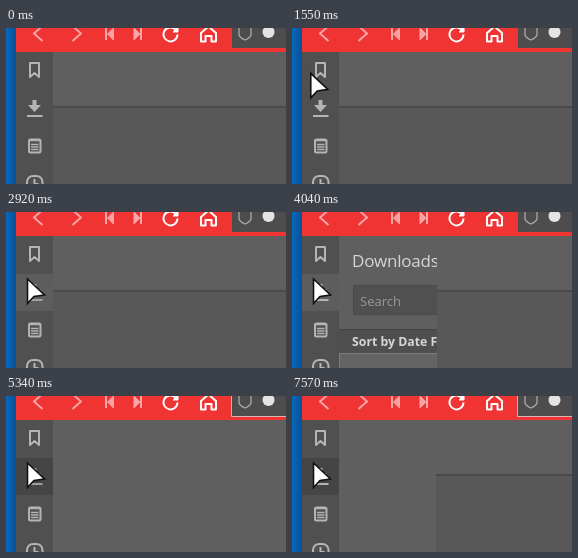
Animation, 280 px wide and 156 px high, one loop 8 s. Source, as an HTML page:

```html
<!DOCTYPE html>
<html lang="en">
<head>
<meta charset="utf-8">
<title>Downloads panel</title>
<style>
  html, body { margin: 0; width: 100%; height: 100%; overflow: hidden; }
  svg { display: block; width: 280px; height: 156px; }
  text { font-family: "Open Sans", "Noto Sans", sans-serif; }
  .line { fill: none; stroke-width: 2; stroke-linejoin: round; }
</style>
</head>
<body>
<svg viewBox="0 0 280 156">
  <defs>
    <linearGradient id="desk">
      <stop offset="0" stop-color="#0869bb"/>
      <stop offset="1" stop-color="#07519a"/>
    </linearGradient>
    <clipPath id="reveal"><rect id="revealBox" x="47" y="24" width="0" height="132"/></clipPath>
  </defs>

  <rect width="10" height="156" fill="url(#desk)"/>
  <rect x="47" y="24" width="233" height="132" fill="#5f5f5f"/>

  <g id="panel" clip-path="url(#reveal)">
    <text x="60" y="55" font-size="17" letter-spacing="-.2" fill="#d6d6d6">Downloads</text>
    <rect x="61.5" y="73.5" width="260" height="29" fill="#505050" stroke="#494949"/>
    <text x="68" y="94" font-size="13" fill="#999">Search</text>
    <rect x="47" y="117" width="233" height="25" fill="#4f4f4f"/>
    <rect x="47" y="117" width="233" height="1" fill="#434343"/>
    <text x="60" y="134" font-size="12.300" font-weight="700" fill="#d6d6d6">Sort by Date Finished</text>
    <rect x="47.5" y="141.5" width="260" height="40" fill="#646464" stroke="#7c7c7c"/>
  </g>

  <g id="page">
    <rect y="78" width="280" height="78" fill="#585858"/>
    <rect y="78" width="280" height="2" fill="#4a4a4a"/>
  </g>

  <rect x="10" y="24" width="37" height="132" fill="#505050"/>
  <rect id="button" x="10" y="62" width="37" height="37"/>
  <g class="line" stroke="#b4b4b4">
    <path d="M24 35h9v14l-4.500-4-4.500 4z"/>
    <rect x="23" y="111.500" width="11.500" height="13" rx="1.500"/>
    <path d="M23 112.500h11.500M25 116.500h7.500M25 119h7.500M25 121.500h7.500" stroke-width="1.300"/>
    <rect x="21" y="148" width="15.500" height="16" rx="6"/>
    <path d="M28.500 151v5h4"/>
  </g>
  <g id="download" fill="#b4b4b4">
    <path d="M26.500 72h4v5h4.500l-6.500 7-6.500-7h4.500z"/>
    <rect x="21" y="87" width="15.500" height="2"/>
  </g>

  <rect x="10" width="270" height="24" fill="#f03333"/>
  <g class="line" stroke="#f9a3a3">
    <path d="M36.500-2l-8.500 7.500 8.500 7.500M66.500-2l8.500 7.500-8.500 7.500"/>
    <path d="M100 0v12M135 0v12"/>
    <path d="M107.500 0v12l-6-6zM128 0v12l6-6z" fill="#f9a3a3" stroke-width="1"/>
  </g>
  <g class="line" stroke="#fff">
    <path d="M169.500 1.500a7 7 0 1 0 2 5"/>
    <path d="M172-1v5h-5z" fill="#fff" stroke-width="1"/>
    <path d="M195 13.500V5l7.500-6.500 7.500 6.500v8.500h-4.500v-5.500h-6v5.500z"/>
  </g>
  <rect x="226" width="54" height="20" fill="#4d4d4d"/>
  <path id="focus" d="M225.500 0v20.500H280" fill="none" stroke="#d8b4b4"/>
  <path d="M233-2v9q1 3 6 5 5-2 6-5v-9z" class="line" stroke="#a8a8a8" style="stroke-width:1.300"/>
  <circle cx="262.500" cy="4" r="6" fill="#e4e4e4"/>

  <path id="cursor" d="M0 0v24.500l6.500-7 10.500-1.500z" fill="#fff" stroke="#111" stroke-width="1.600"/>
</svg>
<script>
const LOOP = 8000;
const OPEN = 3640, CLOSED = 5290;
const el = id => document.getElementById(id);
const clamp = (v, lo, hi) => Math.min(hi, Math.max(lo, v));
const step = (t, offset) => Math.floor((t - offset) / 100) * 100 + offset;

// [time, x, y] of the pointer tip
const path = [[350, 29, -19], [1050, 15.500, 29], [1150, 17, 34.500],
              [2050, 21, 59], [2250, 21.500, 61.500], [2920, 21.500, 67]];

function pointer(t) {
  if (t < 2250) t = step(t, 50);
  const i = path.findIndex(k => k[0] > t);
  if (i < 0) return path.at(-1).slice(1);
  if (i === 0) return [29, -40];
  const [a, b] = [path[i - 1], path[i]];
  const p = (t - a[0]) / (b[0] - a[0]);
  return [a[1] + (b[1] - a[1]) * p, a[2] + (b[2] - a[2]) * p];
}

function pageEdge(t) {
  if (t < CLOSED) return 47 + clamp((step(t, 40) - OPEN) * 0.245, 0, 245);
  if (t < 6670) return 292;
  return 144 + (7570 - Math.min(step(t, 70), 7570)) * 0.136;
}

function buttonColor(t) {
  if (t < 2150) return "none";
  return t >= 2850 && t < CLOSED ? "#5d5d5d" : "#454545";
}

function iconOpacity(t) {
  if (t < 2920) return 1;
  const start = t < CLOSED ? 2920 : 5440;
  return 0.8 + 0.2 * clamp((t - start) / 500, 0, 1);
}

function draw(now) {
  const t = now % LOOP;
  const edge = pageEdge(t);
  el("page").setAttribute("transform", `translate(${edge} 0)`);
  el("revealBox").setAttribute("width", edge - 47);
  el("panel").style.display = t >= OPEN && t < CLOSED ? "" : "none";
  el("button").setAttribute("fill", buttonColor(t));
  el("download").setAttribute("opacity", iconOpacity(t));
  el("focus").style.display = t >= CLOSED ? "" : "none";
  el("cursor").setAttribute("transform", `translate(${pointer(t)})`);
}

const begin = performance.now();
function tick() {
  draw(performance.now() - begin);
  requestAnimationFrame(tick);
}
tick();
</script>
</body>
</html>
```
